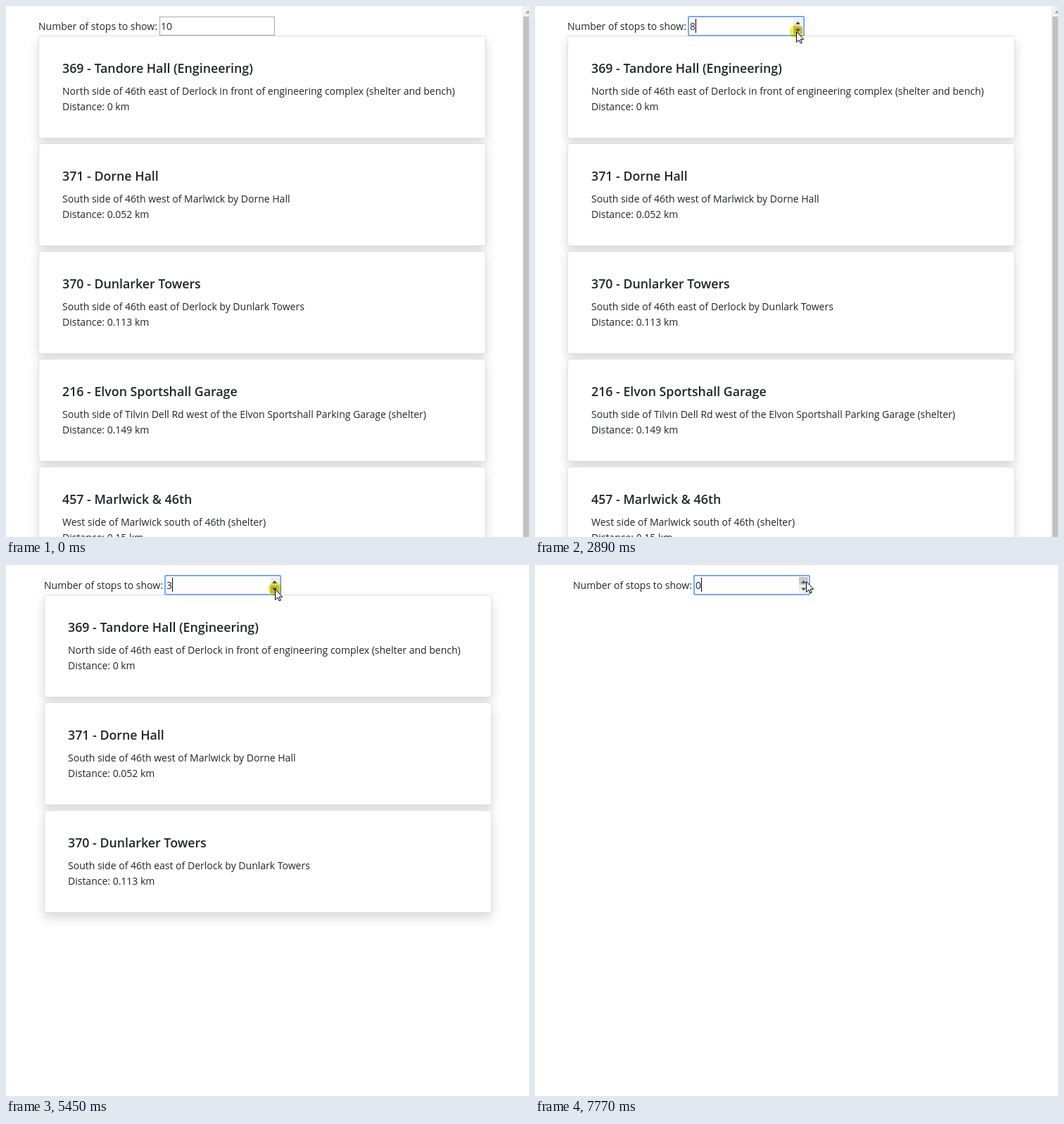
An HTML page that plays this animation: 743x754 px, repeating every 8000 ms.

```html
<!DOCTYPE html>
<html lang="en">
<head>
<meta charset="utf-8">
<title>Nearby stops</title>
<style>
  html, body { margin: 0; width: 100%; height: 100%; overflow: hidden; background: #fff; }
  svg { display: block; }
  text { font: 14px "Open Sans", "Noto Sans", sans-serif; fill: #212529; white-space: pre; }
  .title { font-size: 17.8px; font-weight: 600; }
  .card { fill: #fff; stroke: #dfdfdf; filter: url(#shadow); }
  #glow { mix-blend-mode: multiply; }
</style>
</head>
<body>
<svg width="743" height="754" viewBox="0 0 743 754">
  <defs>
    <filter id="shadow" x="-10%" y="-20%" width="120%" height="150%" color-interpolation-filters="sRGB">
      <feDropShadow dx="0" dy="7.4" stdDeviation="7.4" flood-color="#000" flood-opacity=".15"/>
    </filter>
    <radialGradient id="yellow">
      <stop offset=".75" stop-color="#f7ee48"/>
      <stop offset="1" stop-color="#f7ee48" stop-opacity=".35"/>
    </radialGradient>
  </defs>

  <g id="scrollbar">
    <rect x="733" width="10" height="754" fill="#f1f1f1"/>
    <rect x="735" y="15" width="8" height="739" fill="#c1c1c1"/>
    <path d="M738 10.5l3.5-4 3.5 4z" fill="#a3a3a3"/>
  </g>

  <g id="page">
    <text x="46" y="34">Number of stops to show:</text>
    <rect id="border" x="218.5" y="15.5" width="163" height="26" fill="#fff" stroke="#a9a9a9"/>
    <g id="cards"></g>
    <rect id="ring" x="218" y="15" width="164" height="27" rx="1" fill="none" stroke="#7aa9ee" stroke-width="2"/>
    <rect id="selection" x="220" y="18" width="8" height="20" fill="#3390ff"/>
    <text id="value" x="220" y="34"></text>
    <rect id="caret" x="228" y="18" width="1" height="20" fill="#000"/>
    <g id="spinner">
      <rect id="up" x="367" y="17" width="13" height="11.5"/>
      <rect id="down" x="367" y="28.5" width="13" height="11.5"/>
      <path d="M370 26l3.5-4 3.5 4zM370 32.5l3.5 4 3.5-4z" fill="#505050"/>
    </g>
  </g>

  <circle id="glow" r="10" fill="url(#yellow)"/>
  <path id="cursor" d="M.5.5V15.5L4 12.2 6.3 17 8.3 16.1 6.1 11.3H10.7z" fill="#fff" stroke="#000"/>
</svg>

<script>
const LOOP = 8000, TICK = 65, BLINK = 500, GLOW = 80;
const FOCUS = 2000, SELECT = 3390;
const $ = id => document.getElementById(id);

const stops = [
  ["369 - Tandore Hall (Engineering)", "North side of 46th east of Derlock in front of engineering complex (shelter and bench)", "0"],
  ["371 - Dorne Hall", "South side of 46th west of Marlwick by Dorne Hall", "0.052"],
  ["370 - Dunlarker Towers", "South side of 46th east of Derlock by Dunlark Towers", "0.113"],
  ["216 - Elvon Sportshall Garage", "South side of Tilvin Dell Rd west of the Elvon Sportshall Parking Garage (shelter)", "0.149"],
  ["457 - Marlwick &amp; 46th", "West side of Marlwick south of 46th (shelter)", "0.15"]
];

$("cards").innerHTML = stops.map(([title, place, km], i) => `
  <g transform="translate(46 ${42 + i * 153})">
    <rect class="card" x=".5" y=".5" width="635" height="145" rx="3"/>
    <text class="title" x="34" y="53">${title}</text>
    <text x="34" y="84">${place}</text>
    <text x="34" y="106">Distance: ${km} km</text>
  </g>`).join("");
const cards = [...$("cards").children];

// Every press lowers the value by one, except the one that selects it.
const presses = [2070, 2820, 3070, SELECT, 3950, 4580, 4900, 5450, 6080, 6830, 7510];

// Pointer glides: start, end, x, y
const glides = [
  [240, 760, 388, 28],
  [1070, 1390, 368, 36],
  [1760, 1820, 371, 36],
  [3710, 3950, 382, 34],
  [7640, 7770, 385, 23]
];

const show = (id, on) => $(id).setAttribute("visibility", on ? "visible" : "hidden");
const move = (id, x, y) => $(id).setAttribute("transform", `translate(${x} ${y})`);
const shade = (id, on) => $(id).setAttribute("fill", on ? "#c8c8c8" : "#f0f0f0");

function pointer(t) {
  let x = 733, y = 924;
  for (const [start, end, toX, toY] of glides) {
    if (t < start) break;
    const steps = Math.round((end - start) / TICK) + 1;
    const u = Math.min(1, (Math.floor((t - start) / TICK) + 1) / steps);
    const ease = 1 - (1 - u) ** 2;
    x += (toX - x) * ease;
    y += (toY - y) * ease;
  }
  return [x, y];
}

function draw(t) {
  const done = presses.filter(p => p <= t);
  const last = done.at(-1) ?? -LOOP;
  const count = 10 - done.filter(p => p !== SELECT).length;
  const shift = count < 8 ? 8 : 0;
  const selected = last === SELECT;
  const [x, y] = pointer(t);
  const px = x - shift;
  const hover = px < 382 && y < 42;
  const onButton = hover && px >= 368;

  move("page", shift, 0);
  show("scrollbar", !shift);
  cards.forEach((card, i) => card.setAttribute("visibility", i < count ? "visible" : "hidden"));

  $("value").textContent = count;
  $("value").style.fill = selected ? "#fff" : "";
  show("selection", selected);
  show("caret", !selected && t - last < BLINK);
  show("ring", t >= FOCUS);
  show("border", t < FOCUS);

  show("spinner", hover);
  shade("up", onButton && y < 29);
  shade("down", onButton && y >= 29);

  move("cursor", x, y);
  move("glow", x, y);
  show("glow", t - last < GLOW);
}

const begin = performance.now();
function tick() {
  draw((performance.now() - begin) % LOOP);
  requestAnimationFrame(tick);
}
tick();
</script>
</body>
</html>
```
